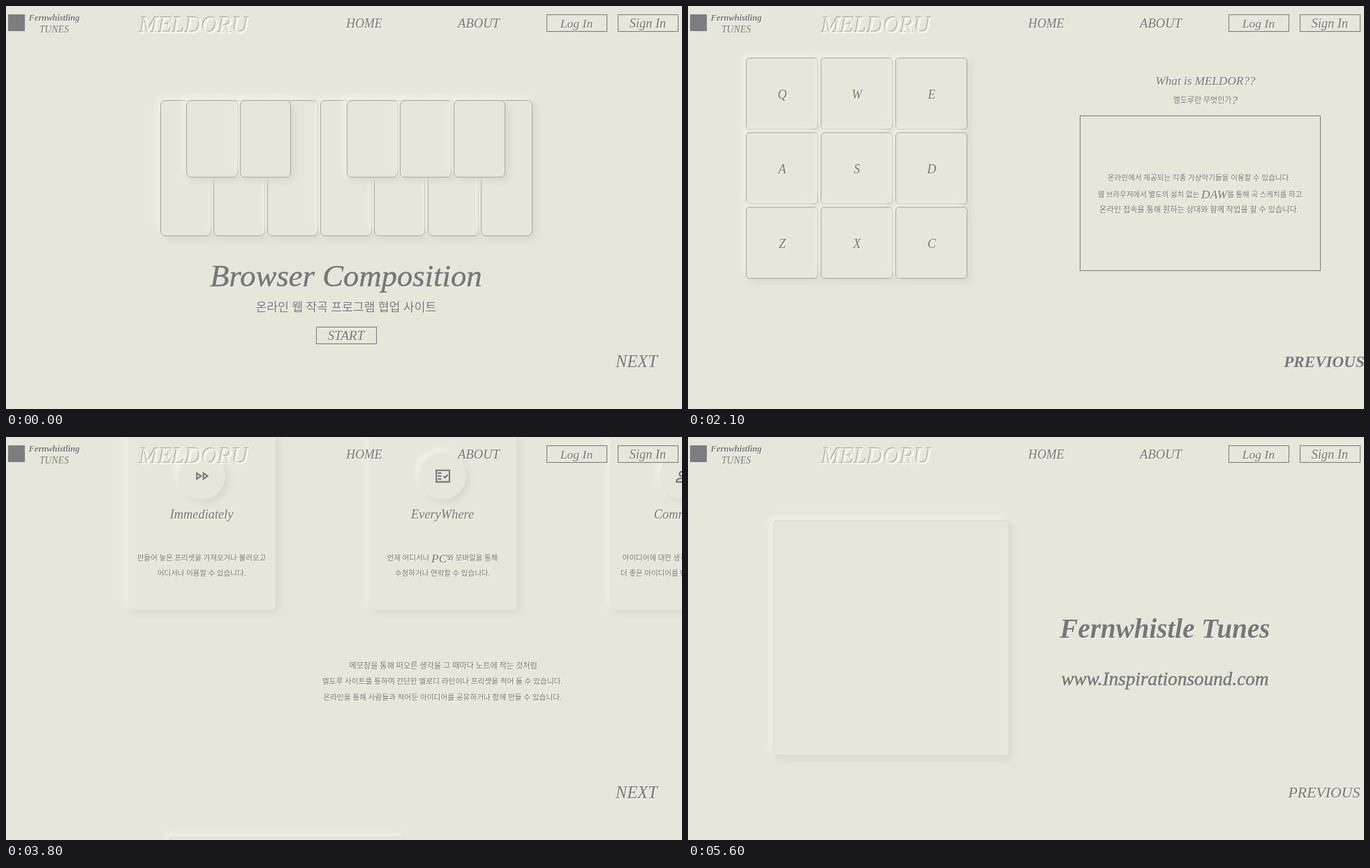
These frames come from a looping animation (968x578 px, 6700 ms). An HTML page:

```html
<!DOCTYPE html>
<html lang="ko">
<head>
<meta charset="utf-8">
<title>Browser Composition</title>
<style>
  html, body { margin: 0; width: 100%; height: 100%; overflow: hidden; background: #e6e6da; }
  body { position: relative; color: #75777b; font: italic 18px "Liberation Serif", "Noto Sans CJK KR", serif; }
  #world, .page, .box, .text, svg { position: absolute; }
  .box { box-sizing: border-box; background: #e6e6da; }
  .raised { box-shadow: 5px 5px 10px #d8d8cd, -5px -5px 10px #f1f1e6; }
  .line { border: 1px solid #a6a7a2; }
  .frame { border: 1px solid #77797b; }
  .faint { border: 1px solid #dadacf; }
  .text { width: 0; display: flex; justify-content: center; line-height: 0; white-space: nowrap;
          text-shadow: 1px 1px 1px #fafaef; }
  .text big { font-size: 17.5px; vertical-align: -.13em; }
  .ko { font-style: normal; }
  .ko big { font-style: italic; }
  .medium { -webkit-text-stroke: .5px; }
  .bold, .hover { font-weight: bold; }
  .brand { color: #eeeee2; text-shadow: -1px -1px 0 #a3a49e, 1px 1px 1px #fffff4; }
  svg { width: 25px; height: 25px; fill: none; stroke: #75777b; stroke-width: 2; }
</style>
</head>
<body>
<div id="world"></div>
<div id="header"></div>
<script>
const W = 968, PITCH = 590, LOOP = 6700;

const box = (x, y, w, h, radius, cls) =>
  `<div class="box ${cls}" style="left:${x}px;top:${y}px;width:${w}px;height:${h}px;border-radius:${radius}px"></div>`;
// Text is centred on (x, y).
const text = (x, y, size, html, cls = '', id = '') =>
  `<div class="text ${cls}" id="${id}" style="left:${x}px;top:${y}px;font-size:${size}px"><span>${html}</span></div>`;
const button = (x, y, label, size) =>
  box(x, y, 87, 25, 0, 'frame') + text(x + 43, y + 13, size, label);
const page = (col, row, dy, html) =>
  `<div class="page" style="left:${col * W}px;top:${row * PITCH + dy}px">${html}</div>`;
const repeat = (list, draw) => list.map(draw).join('');

const piano =
  repeat([0, 1, 2, 3, 4, 5, 6], k => box(220.5 + 76.6 * k, 134.5, 73.5, 195, 7, 'raised line')) +
  repeat([0, 1, 3, 4, 5], k => box(258 + 76.6 * k, 134.5, 73.5, 111, 7, 'raised line')) +
  text(487, 387, 44.7, 'Browser Composition', 'medium') +
  text(487, 433, 17.2, '온라인 웹 작곡 프로그램 협업 사이트', 'ko') +
  button(444, 460, 'START', 19);

const pads =
  repeat([...'QWEASDZXC'], (key, i) => {
    const x = 83 + 107 * (i % 3), y = 130 + 107 * Math.floor(i / 3);
    return box(x, y, 103, 103, 5, 'raised line') + text(x + 52, y + 53, 18, key);
  }) +
  text(741, 164, 17.2, 'What is MELDOR??') +
  text(741, 191, 11, '멜도루란 무엇인가<big>?</big>', 'ko') +
  box(560.5, 212.5, 345, 223, 0, 'frame') +
  text(732, 303, 10.6, '온라인에서 제공되는 각종 가상악기들을 이용할 수 있습니다.', 'ko') +
  text(733, 326, 10.5, '웹 브라우저에서 별도의 설치 없는&nbsp;<big>DAW</big>를 통해 곡 스케치를 하고', 'ko') +
  text(732, 348, 11.2, '온라인 접속을 통해 원하는 상대와 함께 작업을 할 수 있습니다.', 'ko');

const effects =
  repeat([0, 1, 2], i =>
    box(132, 220.5 + 79.5 * i, 318, 46, 20, 'raised line') +
    box(270, 222 + 79.5 * i, 42, 42, 21, 'raised line')) +
  text(620, 281, 35, 'EFFECT', 'medium') +
  text(671, 325, 23, '다양한 이펙터 기능 제공', 'ko') +
  text(682, 380, 11.5, '웹 페이지안에서 다양한 이펙터를 사용할 수 있습니다.', 'ko');

const cards = [
  ['Immediately', 'M5 8v8l5.8-4zM14 8v8l5.8-4z',
    '만들어 놓은 프리셋을 가져오거나 불러오고', '어디서나 이용할 수 있습니다.'],
  ['EveryWhere', 'M3 4h18v16H3zM5 8h5M5 12h5M5 16h5M13 12l2 2 4-4',
    '언제 어디서나&nbsp;<big>PC</big>와 모바일을 통해', '수정하거나 연락할 수 있습니다.'],
  ['Community', 'M6 9a3 3 0 1 0 6 0a3 3 0 1 0-6 0M2 20v-1.5c0-2 4-3.5 7-3.5s7 1.5 7 3.5V20zM16 6.5q2 2.5 0 5M19.5 3.5q4.5 5.5 0 11',
    '아이디어에 대한 생각이나 방법들을 공유', '더 좋은 아이디어를 만들 수 있는 커뮤니티'],
];
const about =
  repeat(cards, ([title, icon, first, second], i) => {
    const x = 64 + 345 * i, cx = x + 105;
    return box(x, 72, 211, 253, 4, 'raised') +
      box(cx - 34, 99, 68, 68, 34, 'raised') +
      `<svg viewBox="0 0 24 24" style="left:${cx - 12}px;top:121px"><path d="${icon}"/></svg>` +
      text(cx, 188, 18.4, title) +
      text(cx, 251, 10.5, first, 'ko') +
      text(cx, 273, 10.5, second, 'ko');
  }) +
  text(515, 405, 11.2, '메모장을 통해 떠오른 생각을 그 때마다 노트에 적는 것처럼', 'ko') +
  text(514, 427, 10.7, '멜도루 사이트를 통하여 간단한 멜로디 라인이나 프리셋을 적어 둘 수 있습니다.', 'ko') +
  text(514, 450, 10.7, '온라인을 통해 사람들과 적어둔 아이디어를 공유하거나 함께 만들 수 있습니다.', 'ko');

const contact =
  box(122, 119, 338, 338, 5, 'raised faint') +
  text(683, 275, 39, 'Fernwhistle Tunes', 'bold') +
  text(683, 347, 27.2, 'www.Inspirationsound.com', 'medium');

const world = document.getElementById('world');
world.innerHTML =
  page(0, 0, 0, piano) + page(0, 1, 0, pads) + page(0, 2, -35, effects) +
  page(1, 0, 58, about) + page(1, 1, 0, contact);

document.getElementById('header').innerHTML =
  '<div class="box" style="left:3px;top:12px;width:24px;height:24px;background:#7b7d80"></div>' +
  text(69, 17, 12.5, 'Fernwhistling', 'bold') +
  text(69, 34, 13.8, 'TUNES') +
  text(269, 27, 32.7, 'MELDORU', 'brand') +
  text(513, 25, 17.8, 'HOME') +
  text(677, 25, 18.6, 'ABOUT', '', 'aboutLink') +
  button(774, 12, 'Log In', 17.6) + button(876, 12, 'Sign In', 18.3) +
  text(0, 510, 24, '', '', 'pager');

const aboutLink = document.getElementById('aboutLink');
const pager = document.getElementById('pager');

// [start time, column, row] of each camera move
const moves = [[1033, 0, 1], [2050, 0, 2], [3500, 1, 0], [4649, 1, 1]];
// [start time, label, hovered]
const pagerStates = [
  [0, 'NEXT', false], [700, 'NEXT', true], [2100, 'PREVIOUS', true], [2900, 'PREVIOUS', false],
  [3600, 'NEXT', false], [4400, 'NEXT', true], [4700, 'PREVIOUS', true], [5600, 'PREVIOUS', false],
];

// CSS "ease", cubic-bezier(.25, .1, .25, 1), settled once past 90 %
function ease(t) {
  if (t <= 0) return 0;
  if (t > .9) return 1;
  const curve = (s, a, b) => 3 * (1 - s) ** 2 * s * a + 3 * (1 - s) * s * s * b + s ** 3;
  let lo = 0, hi = 1;
  for (let i = 0; i < 24; i++) {
    const mid = (lo + hi) / 2;
    if (curve(mid, .25, .25) < t) lo = mid; else hi = mid;
  }
  return curve(lo, .1, 1);
}

function setHover(el, on, size) {
  el.classList.toggle('hover', on);
  el.style.fontSize = size * (on ? 1.06 : 1) + 'px';
}

function render(time) {
  let x = 0, y = 0;
  for (const [start, col, row] of moves) {
    const p = ease((time - start) / 500);
    x += (col - x) * p;
    y += (row - y) * p;
  }
  world.style.transform = `translate(${-x * W}px, ${-y * PITCH}px)`;

  const [, label, hovered] = pagerStates.findLast(state => state[0] <= time);
  const next = label === 'NEXT';
  pager.firstChild.textContent = label;
  pager.style.left = (next ? 903 : 911) + 'px';
  setHover(pager, hovered, next ? 24.5 : 21.8);
  setHover(aboutLink, time >= 3200 && time < 3600, 18.6);
}

const began = performance.now();
function tick() {
  const time = (performance.now() - began) % LOOP;
  render(Math.floor(time / 100) * 100); // ten steps a second
  requestAnimationFrame(tick);
}
tick();
</script>
</body>
</html>
```
